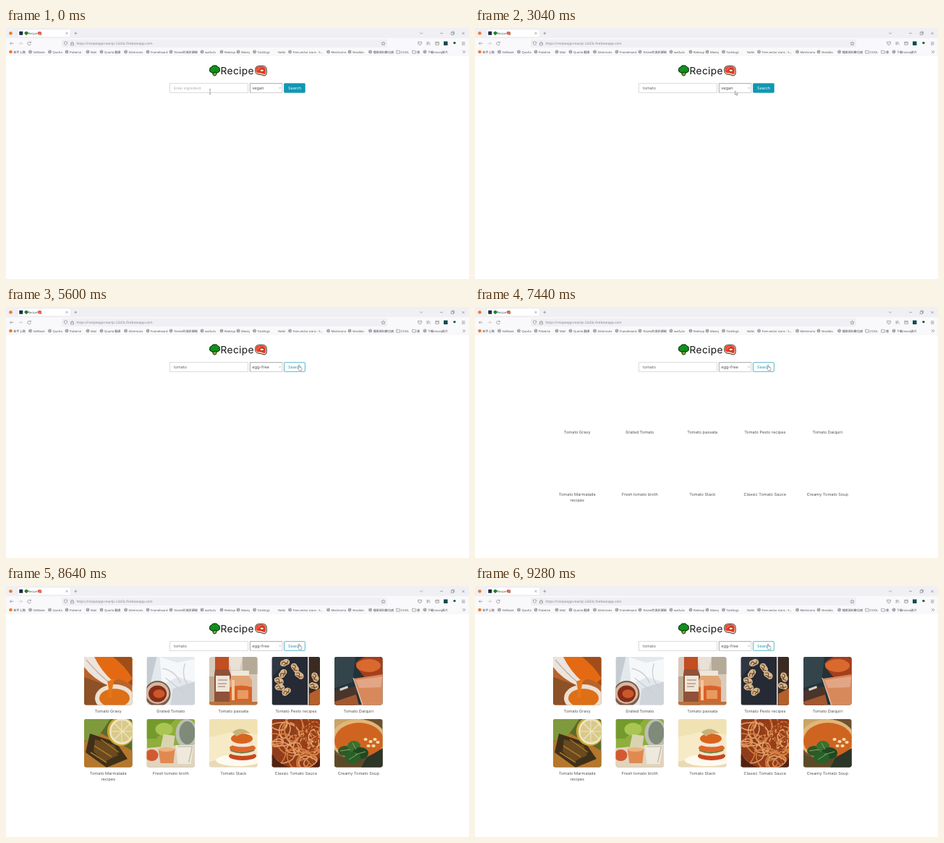
These frames come from a looping animation (640 px wide and 347 px high, 9360 ms). An HTML page:

```html
<!DOCTYPE html>
<html lang="en">
<head>
<meta charset="utf-8">
<title>Recipe</title>
<style>
  html, body { margin: 0; width: 100%; height: 100%; overflow: hidden; background: #fff; }
  svg { display: block; }
  text { font-family: Inter, sans-serif; text-rendering: geometricPrecision; white-space: pre; }
  .chrome text { font-family: "Open Sans", "Noto Sans CJK TC", "Noto Sans CJK", sans-serif; font-size: 4.1px; fill: #4a4a50; }
  .icons { fill: none; stroke: #6b6b72; stroke-width: .55; }
  .label { font-size: 5.6px; fill: #555; text-anchor: middle; }
</style>
</head>
<body>
<svg id="stage" width="100%" height="100%" viewBox="0 0 640 347" preserveAspectRatio="none">
  <defs>
    <clipPath id="round"><rect width="66.5" height="66.5" rx="3"/></clipPath>
    <g id="broccoli">
      <path d="M4.6 8L5.4 14Q7.5 16.3 9.8 14L10.8 8Z" fill="#7fae2c" stroke="#111c08" stroke-width=".9"/>
      <path d="M3 10.5Q0 9.5 .7 6.5Q.6 3.5 3.5 3Q4.5 .4 7.5 .9Q11 .2 12 2.8Q15 3.5 14.6 6.5Q15.2 9.7 12.4 10.4Q10.5 12 8.5 10Q5.5 12.3 3 10.5Z" fill="#0f8d1c" stroke="#062a0a" stroke-width="1"/>
      <path d="M4 5Q6 3 7.5 5M9 4Q11 3 12 5M5 8Q7 6.5 8 8" fill="none" stroke="#25a526" stroke-width=".7"/>
    </g>
    <g id="steak">
      <path d="M1 6Q1 1.2 6 1H12Q16.6 1.6 16.4 6.5Q17.5 14.5 13 14.5Q9 12.5 5 12.5Q.5 12 1 6Z" fill="#fde0cc" stroke="#1b100d" stroke-width=".9"/>
      <path d="M1.9 6Q2 2 6 1.9H11.6Q15.6 2.4 15 7Q15.6 12.6 13 12.5Q9 10.2 5 10.7Q1.6 10.4 1.9 6Z" fill="#ee3a22"/>
      <path d="M4 7.2Q4 4.2 8 4" fill="none" stroke="#ff9c7c" stroke-width=".8"/>
      <ellipse cx="10" cy="7.3" rx="2.8" ry="1.8" fill="#fff1df" stroke="#5e1510" stroke-width=".7"/>
    </g>
  </defs>

  <g class="chrome">
    <path d="M0 0H640V14H0Z" fill="#f0f0f4"/>
    <path d="M0 14H640V38H0Z" fill="#f9f9fb"/>
    <path d="M0 38H640" stroke="#e9e9ed" stroke-width=".5"/>
    <rect x="16" y="1.8" width="73.5" height="11" rx="1.5" fill="#fff" stroke="#dcdce2" stroke-width=".5"/>
    <circle cx="6.5" cy="7.3" r="2.3" fill="#f07a28"/>
    <rect x="18.3" y="4.7" width="5" height="5" fill="#1d2a40"/>
    <use href="#broccoli" transform="translate(25.5 4.7) scale(.34)"/>
    <text x="30.5" y="8.8">Recipe</text>
    <use href="#steak" transform="translate(43.5 4.9) scale(.34)"/>
    <rect x="77" y="15.7" width="450" height="11" rx="1.5" fill="#f0f0f4"/>
    <text x="97.5" y="22.9" style="font-size:4.65px;fill:#7b7b82">https://recipeapp-reactjs-22d3c.firebaseapp.com</text>
    <g class="icons">
      <path d="M82.5 5.8l3 3m0-3l-3 3M94.3 7.3h4m-2-2v4M572 6.3l2 2 2-2M600 7.3h4M615.3 6.2h3.2v3.2h-3.2zM616.3 6v-.9h3.3v3.3h-1M630.5 5.8l3.2 3.2m0-3.2l-3.2 3.2"/>
      <path d="M10.5 21.3h-5m2-2l-2 2 2 2"/>
      <path d="M17.5 21.3h5m-2-2l2 2-2 2" stroke="#b5b5bb"/>
      <path d="M33.8 20A2.3 2.3 0 1 0 34.3 22M34.4 18.7v1.7h-1.7"/>
      <path d="M82.5 18.8l2.2 .8q0 3-2.2 4.2q-2.2-1.2-2.2-4.2zM89.5 21h4v2.8h-4zM90.3 21v-1q1.2-1.8 2.4 0v1"/>
      <path d="M521.5 18.8l.8 1.7 1.8.2-1.3 1.3.3 1.8-1.6-.9-1.6.9.3-1.8-1.3-1.3 1.8-.2z"/>
      <path d="M569.5 19.3h5v2.4q-2.5 4-5 0zM571 20.7l1 1 1-1M582 19v4.5m1.3-4.5v4.5m1.3-4.5l1.7 4.5M593.8 19.3h4.5v4h-4.5zM593.8 20.7h4.5"/>
      <path d="M630 19.7h4.5m-4.5 1.7h4.5m-4.5 1.7h4.5M631 31l2 2-2 2m2-4l2 2-2 2"/>
    </g>
    <rect x="605" y="18.5" width="5.5" height="5.5" fill="#0d4a52"/>
    <circle cx="620" cy="20.6" r="1.7" fill="#1d5b33"/>
    <g id="bookmarks"></g>
  </g>

  <use href="#broccoli" x="280.8" y="51"/>
  <text x="296.6" y="64" font-size="13.7" letter-spacing=".35" fill="#161616">Recipe</text>
  <use href="#steak" x="343.7" y="51.5"/>

  <rect x="226.4" y="76.7" width="108.2" height="12.6" fill="#fff" stroke="#cbcbcb" stroke-width=".7"/>
  <text id="field" x="232" y="84.9"></text>
  <rect x="337.3" y="76.7" width="44.6" height="12.6" fill="#fff" stroke="#bbb" stroke-width=".7"/>
  <path d="M337.3 89.5V76.7H382" fill="none" stroke="#999" stroke-width=".6"/>
  <text id="diet" x="340.2" y="85" font-size="5.7" fill="#555"></text>
  <path d="M377.5 82.3l1.2 1.2 1.2-1.2" class="icons"/>
  <rect id="button" x="384.5" y="76.7" width="28.8" height="12.6" rx=".7" stroke="#1197b2" stroke-width=".7"/>
  <text id="search" x="399" y="84.9" font-size="5.4" text-anchor="middle">Search</text>

  <g id="results"></g>
  <g id="menu"></g>
  <g id="pointer" stroke="#555" stroke-width=".5" fill="#fff">
    <path d="M-1-3.3H1M0-3.3V3.3M-1 3.3H1"/>
    <path d="M0 0V5.4L1.3 4.2L2.2 6.2L3.1 5.8L2.2 3.9H3.9Z"/>
    <path d="M-.5 .2Q.3-.7 .9 .2V3L3.4 3.7Q4.2 4 4 5.2L3.5 7.7H.4L-1.8 4.7Q-1.6 3.8-.5 4.6Z"/>
  </g>
</svg>

<script>
const $ = id => document.getElementById(id);
const LOOP = 9360;

// Bookmarks: icon centre, title, icon kind
const bookmarks = [
  [6.5, '新手上路', 'fox'], [33.5, 'VidNook'], [60.5, 'Quorla'], [84, 'Palverse'], [113, 'Mail'],
  [132, 'Quorla 翻譯'], [165.5, 'Glimmorix'], [196, 'Framehoard'], [228, 'Tolven的資訊硬碟'],
  [271, 'waifu2x'], [298, 'Reelzup'], [321, 'Moviq'], [343.5, 'Tacklings'], [372, 'Nolbi', 'none'],
  [392.5, 'Free vector icons - S…'], [445.5, 'Meshnorio'], [475, 'Vendolo'], [503.5, '檔案資料數位感'],
  [542, 'COOL', 'folder'], [564, '書', 'folder'], [579, '下載moviq影片']
];
const bookmarkIcon = (x, kind) => ({
  fox: `<circle cx="${x}" cy="33" r="2.3" fill="#f07a28"/>`,
  folder: `<path class="icons" d="M${x - 2.3} 31h1.8l.7.8h2.5v3.2h-5z"/>`,
  none: ''
})[kind] ?? `<circle cx="${x}" cy="33" r="2.4" fill="#96969b"/>
  <path d="M${x - 1.4} 32q1.4-1.2 1.4 0t1.4 1.2M${x - 1} 34.2h1.5" fill="none" stroke="#eee" stroke-width=".6"/>`;
$('bookmarks').innerHTML = bookmarks.map(([x, title, kind]) =>
  bookmarkIcon(x, kind) + `<text x="${x + 4}" y="34.5">${title}</text>`).join('');

// Flat food pictures on a 67 by 67 tile
const path = (d, fill) => `<path d="${d}" fill="${fill}"/>`;
const oval = (x, y, rx, ry, fill) => `<ellipse cx="${x}" cy="${y}" rx="${rx}" ry="${ry}" fill="${fill}"/>`;
const line = (d, stroke, width = 1) => `<path d="${d}" fill="none" stroke="${stroke}" stroke-width="${width}"/>`;
const box = (x, y, w, h, fill) => `<rect x="${x}" y="${y}" width="${w}" height="${h}" fill="${fill}"/>`;
const fill = color => box(0, 0, 67, 67, color);
const walnut = (x, y, turn = 0) => `<g transform="translate(${x} ${y}) rotate(${turn})">` +
  path('M-7 1Q-6-5-1-4Q5-6 7 0Q6 5 1 4Q-5 6-7 1Z', '#d6b78d') + line('M-5 1Q-2-4 0 0T5-1M-3 3Q1 1 3 3', '#6d4a2c', 1.2) + '</g>';

let seed = 7;
const random = () => (seed = seed * 16807 % 2147483647) / 2147483647;
const noodles = Array.from({ length: 46 }, (_, i) => {
  const x = random() * 67, y = random() * 67, r = 8 + random() * 17;
  return `<ellipse cx="${x}" cy="${y}" rx="${r}" ry="${r * .65}" transform="rotate(${random() * 180} ${x} ${y})"
    fill="none" stroke="${['#d47c42', '#9c3f18', '#e2a067'][i % 3]}" stroke-width="1.6"/>`;
}).join('');

const photos = [
  fill('#b8632a') + path('M28 0H67V40L50 26Z', '#a14d1a') + path('M0 28L34 40L20 67H0Z', '#8c5126') +
    path('M14 0H40Q56 12 67 30L60 36Q46 26 40 36Q20 20 14 0Z', '#e36a12') +
    path('M0 0H14Q24 20 40 34L34 40Q12 30 0 14Z', '#ece4de') + line('M3 4Q18 22 35 36', '#c9b5a6', 1.5) +
    oval(42, 57, 27, 19, '#ece0d2') + oval(42, 57, 21, 13, '#dd6f16') + path('M32 34L42 30Q38 46 38 56H33Q35 44 32 34Z', '#e87617'),

  fill('#e3e8ec') + path('M0 0H14L5 38L0 42Z', '#c3ccd2') + path('M18 0L42 8L67 3V35L43 28L21 38Z', '#f5f7f9') +
    path('M36 44L67 34V67H33Z', '#cfd4da') + line('M22 16Q39 19 47 36M53 9Q46 30 62 45M26 29L52 50', '#c9cfd5', 1.3) +
    oval(15, 51, 18, 18, '#7d5a46') + oval(15, 50, 16, 15, '#d3b9a2') + oval(15, 51, 12.5, 11.5, '#8a2c18') + oval(17, 51, 8, 6, '#c9582a'),

  fill('#d8cbbb') + box(46, 0, 21, 24, '#b5aa98') + path('M26 0H46L42 18H30Z', '#e9e0d6') + box(0, 27, 8, 40, '#bda98f') +
    path('M8 0H27V17H8Z', '#c14f22') + path('M8 17H27L30 25V67H7V24Z', '#8f5238') + box(9, 26, 19, 22, '#efe6d8') +
    line('M12 32H25M12 37H24M12 41H22', '#9a7768', 1.2) + box(30, 19, 25, 7, '#efe6da') +
    path('M31 26H55L59 33V66H28V33Z', '#e3a473') + path('M28 42Q44 37 59 42V66H28Z', '#d8632a') + box(31, 32, 4, 28, '#f4c79c') +
    box(39, 46, 15, 12, '#e79a62') + box(0, 62, 67, 5, '#b9723e'),

  fill('#252a34') + path('M0 0H27L0 28Z', '#303743') + box(51, 0, 16, 67, '#3a2a22') + box(49.5, 0, 1.6, 67, '#e8e2da') +
    walnut(10, 33, 30) + walnut(18, 8, -20) + walnut(32, 15, 60) + walnut(20, 48, -35) + walnut(11, 42, 10) +
    walnut(38, 25, 40) + walnut(15, 23, -50) + walnut(60, 28, 70) + walnut(58, 40, 20) + path('M52 51L67 43V67H52Z', '#b5602a'),

  fill('#243238') + path('M0 0H29L25 35L0 43Z', '#33454a') + path('M0 47L33 40L28 67H0Z', '#4a352b') + path('M0 62L30 52L34 67H0Z', '#a3572f') +
    path('M29 9Q45-8 67 2V34Q42 39 29 9Z', '#a53e1b') + oval(47, 12, 17, 9, '#d9692f') +
    path('M27 30L67 24V67H38Z', '#d8895c') + path('M29 32L67 27L64 42L34 43Z', '#e3a685') +
    line('M26 29L39 67', '#d9cabb', 1.2) + path('M7 44L18 40L19 43L8 47Z', '#d7d2c8'),

  fill('#5d6a2a') + path('M0 0H36L18 27L0 30Z', '#7f9a3c') + path('M0 31L24 20L67 44V67H0Z', '#b5772c') +
    path('M8 20L44 32L60 55L31 67L2 46Z', '#40301a') + path('M15 28L42 36L47 50L28 59L13 45Z', '#6a4a1e') +
    line('M14 37L38 52M23 28L48 46M9 46L31 60', '#a5772b', 1.5) + oval(51, 17, 19, 20, '#c9a936') + oval(52, 17, 17, 18, '#eee6c2') +
    oval(52, 17, 14.5, 15, '#d9c98a') + line('M52 1V33M37 17H67M42 6L64 28M64 6L42 28', '#efe6c4', 1.1),

  fill('#8fae3c') + path('M0 0H40L13 27H0Z', '#749a2e') + oval(24, 14, 12, 9, '#a9c552') + path('M0 40L67 34V67H0Z', '#e0d3bf') +
    oval(55, 20, 15, 20, '#bcc0b4') + oval(56, 19, 11, 16, '#7f8a78') + path('M23 21L39 23L36 45H18Z', '#d9d4b0') +
    path('M16 41H39L37 61H19Z', '#e08a52') + path('M40 36H65L61 62H43Z', '#efe8dc') +
    oval(7, 50, 9, 8, '#d25a30') + oval(27, 42, 11, 3, '#efb27c') + line('M43 38H63L58 60', '#b7b5a3', 1.2),

  fill('#f6ebc6') + path('M0 0H67V22L39 16L0 25Z', '#f1e2b4') + path('M0 59L44 49L67 61V67H0Z', '#e8d9b8') + oval(40, 57, 31, 8, '#fffaf0') +
    oval(46, 51, 19, 6, '#c8471e') + oval(46, 46, 18, 5, '#f3e2c6') + oval(46, 40, 18, 6, '#e0672a') +
    oval(46, 34, 16, 4.5, '#f3e6d6') + oval(45, 27, 15, 7, '#d9641f') + path('M32 18Q44 8 57 20Q46 18 38 24Z', '#c9b27a') +
    line('M29 43Q44 50 62 43', '#6c7d3c', 1.8),

  fill('#8e3c1b') + noodles + path('M0 48Q9 63 26 67H0Z', '#4f2216') + path('M67 52Q62 63 52 67H67Z', '#4f2216'),

  fill('#6d5130') + path('M0 0H30L0 24Z', '#c9a468') + oval(33, 28, 38, 28, '#e0b67a') + oval(34, 30, 34, 25, '#cf6420') +
    path('M0 48Q30 66 67 40V67H0Z', '#5b4a2a') + path('M44 54L67 40V67H37Z', '#2b3528') +
    oval(15, 44, 10, 7, '#2f5728') + oval(27, 38, 9, 8, '#3b7030') + oval(36, 47, 11, 8, '#1f4823') + oval(25, 53, 11, 8, '#28602a') +
    line('M8 44L22 42M25 33L30 42M29 49L43 45M20 56L31 49', '#86a65d') +
    [[43, 28], [50, 31], [47, 37], [56, 28], [54, 37], [60, 32]].map(([x, y]) => oval(x, y, 2.6, 1.9, '#f1dfac')).join('')
];

const recipes = ['Tomato Gravy', 'Grated Tomato', 'Tomato passata', 'Tomato Pesto recipes', 'Tomato Daiquiri',
  'Tomato Marmalade|recipes', 'Fresh tomato broth', 'Tomato Stack', 'Classic Tomato Sauce', 'Creamy Tomato Soup'];
const loadTimes = [7760, 7760, 7840, 7840, 7920, 8000, 8000, 8080, 8080, 8400];
$('results').innerHTML = recipes.map((name, i) => {
  const lines = name.split('|').map((part, n) => `<text class="label" x="33.3" y="${76.8 + n * 8}">${part}</text>`).join('');
  return `<g transform="translate(${108 + i % 5 * 86.5} ${i < 5 ? 98 : 184})">
    <g clip-path="url(#round)">${photos[i]}</g><g>${lines}</g></g>`;
}).join('');

const diets = ['vegan', 'vegetarian', 'paleo', 'dairy-free', 'gluten-free', 'wheat-free', 'fat-free', 'low-sugar', 'egg-free'];
const ROW = 7.2;
$('menu').innerHTML = `<rect x="337.3" y="89.8" width="44.6" height="${ROW * diets.length}" fill="#fff" stroke="#aaa" stroke-width=".6"/>` +
  diets.map((diet, i) => `<g class="option"><rect x="337.6" y="${90 + i * ROW}" width="44" height="${ROW}"/>
    <text x="340.2" y="${95.3 + i * ROW}" font-size="5.4">${diet}</text></g>`).join('');
const options = [...document.querySelectorAll('.option')];
const tiles = [...$('results').children];

// Pointer stops: time, x, y
const stops = [[0, 282, 88], [2000, 282, 88], [2800, 359.5, 87], [3360, 359.5, 87], [4160, 358, 151],
  [4320, 358, 151], [5100, 405, 80.2], [LOOP, 405, 80.2]];
function pointerAt(t) {
  const next = stops.findIndex(stop => stop[0] > t);
  const [t0, x0, y0] = stops[next - 1], [t1, x1, y1] = stops[next];
  const p = (t - t0) / (t1 - t0), k = p * p * (3 - 2 * p);
  return [x0 + (x1 - x0) * k, y0 + (y1 - y0) * k];
}
const show = (element, visible) => element.setAttribute('visibility', visible ? 'inherit' : 'hidden');

function draw(time) {
  const t = Math.floor(time % LOOP / 80) * 80;

  const typed = 'tomato'.slice(0, Math.max(0, Math.floor((t - 960) / 160) + 1));
  const field = $('field');
  field.textContent = typed || 'Enter ingredient';
  field.setAttribute('font-size', typed ? 5.5 : 5);
  field.setAttribute('fill', typed ? '#666' : '#aaa');

  const [x, y] = pointerAt(t);
  const menuOpen = t >= 3280 && t < 4320;
  const hover = x > 384 && y < 90;
  $('diet').textContent = t < 4320 ? 'vegan' : 'egg-free';
  show($('menu'), menuOpen);
  const active = Math.max(0, Math.floor((y - 90) / ROW));
  options.forEach((option, i) => {
    option.children[0].setAttribute('fill', i === active ? '#1a78d2' : '#fff');
    option.children[1].setAttribute('fill', i === active ? '#fff' : '#444');
  });

  $('button').setAttribute('fill', hover ? '#fff' : '#1197b2');
  $('search').setAttribute('fill', hover ? '#1197b2' : '#fff');

  $('pointer').setAttribute('transform', `translate(${x} ${y})`);
  show($('pointer'), t < 960 || t >= 2000);
  const shape = hover ? 2 : x < 335 ? 0 : 1;
  [...$('pointer').children].forEach((cursor, i) => show(cursor, i === shape));

  show($('results'), t >= 6640);
  tiles.forEach((tile, i) => {
    const loaded = t >= loadTimes[i];
    show(tile.children[0], loaded);
    // Lower labels sit further down until their picture arrives.
    const drop = i >= 5 && t >= 7840 && !loaded ? 45 : 0;
    tile.children[1].setAttribute('transform', `translate(0 ${drop})`);
  });
}

const start = performance.now();
function frame() {
  draw(performance.now() - start);
  requestAnimationFrame(frame);
}
frame();
</script>
</body>
</html>
```
